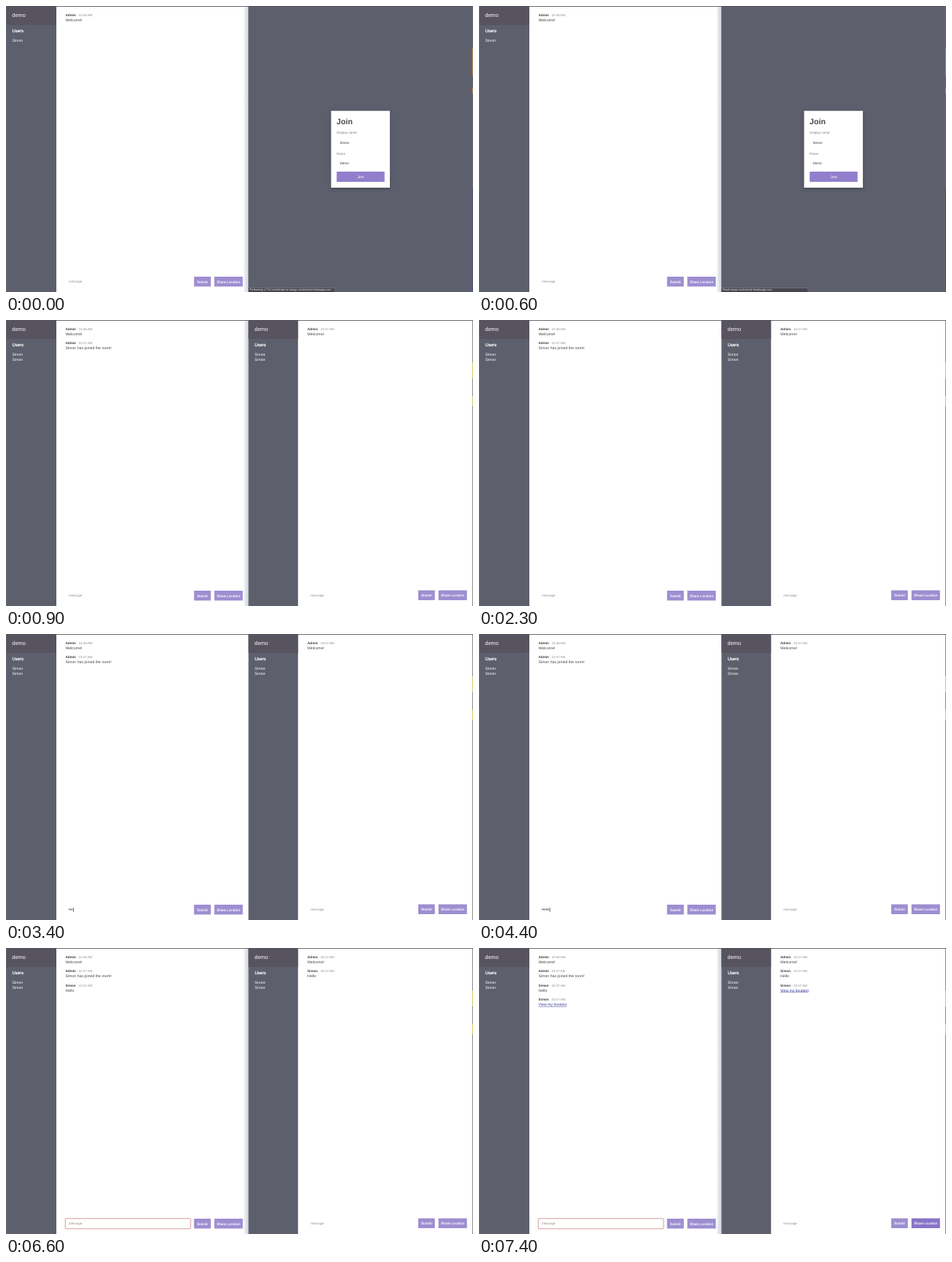
These frames come from a looping animation (640 px wide and 392 px high, 8000 ms). An HTML page:

```html
<!DOCTYPE html>
<html lang="en">
<head>
<meta charset="utf-8">
<title>Chat demo</title>
<style>
  html, body { margin: 0; width: 100%; height: 100%; overflow: hidden; background: #fff; }
  svg { display: block; width: 640px; height: 392px; }
  text {
    font-family: "Liberation Sans", Arial, Helvetica, sans-serif;
    text-rendering: geometricPrecision;
    white-space: pre;
  }
</style>
</head>
<body>
<svg id="stage" viewBox="0 0 640 392" xmlns="http://www.w3.org/2000/svg">
  <defs>
    <linearGradient id="edge">
      <stop offset="0" stop-color="#f4f6f8"/>
      <stop offset=".35" stop-color="#e3e8ec"/>
      <stop offset="1" stop-color="#cbd2d8"/>
    </linearGradient>
    <filter id="soft" x="-20%" y="-20%" width="140%" height="140%">
      <feGaussianBlur stdDeviation="2.5"/>
    </filter>
  </defs>
</svg>
<script>
const LOOP = 8000;
const USER = "Simon";
const HOST = "mango-socketchat.herokuapp.com";
const SLATE = "#5d606c", HEAD = "#57535f", LILAC = [157, 142, 209], VIOLET = [135, 116, 199];
const JOINED = 700, LISTED = 800, GREETED = 900, SENT = 5100, BLUR = 6600, SHARED = 7300;

const stage = document.getElementById("stage");
const timed = [];

// Adds a shape; spans are [start, end] pairs in ms during which it shows.
function add(tag, attrs, ...spans) {
  const el = document.createElementNS(stage.namespaceURI, tag);
  for (const k in attrs) el.setAttribute(k, attrs[k]);
  stage.append(el);
  if (spans.length) timed.push({ el, spans });
  return el;
}
const rect = (x, y, width, height, fill, ...spans) =>
  add("rect", { x, y, width, height, fill }, ...spans);

function text(str, x, y, size, fill, more, ...spans) {
  const el = add("text", { x, y, "font-size": size, fill, ...more }, ...spans);
  el.textContent = str;
  return el;
}
const from = t => [t, LOOP];
const rgb = c => `rgb(${c.map(Math.round).join()})`;
const bold = { "font-weight": 700 };
const mid = { "text-anchor": "middle" };

function button(label, x, y, w) {
  const el = rect(x, y, w, 13.5, rgb(LILAC));
  text(label, x + w / 2, y + 8.5, 4.78, "#fff", { ...mid, stroke: "#fff", "stroke-width": .12 });
  return el;
}

function message(x, row, who, time, body, start, link) {
  const y = 13.8 + row * 19.55, span = from(start);
  text(who, x, y, 4.65, "#3c3c40", bold, span);
  text(time, x + 18, y, 4.45, "#8a8a8e", {}, span);
  text(body, x, y + 6.9, 5.2, link ? "#34349c" : "#444448", {}, span);
  if (link) rect(x, y + 7.5, 38.5, .5, "#34349c", span);
}

function sidebar(x, w, titled, second, first) {
  rect(x, 0, w, 392, SLATE);
  rect(x, 0, w, 26, HEAD, from(titled));
  text("demo", x + 8.3, 15.4, 7.4, "#fff", {}, from(titled));
  text("Users", x + 8.5, 35.7, 5.9, "#fff", { stroke: "#fff", "stroke-width": .22 }, from(titled));
  text(USER, x + 8.5, 48.8, 5.2, "#fff", {}, from(first));
  text(USER, x + 8.5, 55.8, 5.2, "#fff", {}, from(second));
}

// Left window
rect(0, 0, 640, 392, "#fff");
sidebar(0, 69, 0, LISTED, 0);
message(81.5, 0, "Admin", "10:46 AM", "Welcome!", 0);
message(81.5, 1, "Admin", "10:47 AM", USER + " has joined the room!", GREETED);
message(81.5, 2, USER, "10:47 AM", "Hello", SENT);
message(81.5, 3, USER, "10:47 AM", "View my location", SHARED, true);
rect(326, 0, 6.5, 392, "url(#edge)", [0, 2300], from(BLUR));

const box = { x: 81.2, y: 370.8, width: 171.8, height: 14, rx: .8, fill: "none" };
add("rect", { ...box, stroke: "#f6c9d1", "stroke-width": 1.3 }, [SENT, BLUR]);
add("rect", { ...box, stroke: "#dd8f98", "stroke-width": .6 }, [SENT, BLUR]);
add("rect", { ...box, stroke: "#d38f92", "stroke-width": .9 }, from(BLUR));
text("message", 86, 379.4, 4.56, "#8d8d91", {}, [0, 3300], from(SENT));
const draft = text("", 86, 379.4, 4.65, "#2c2c30", {});
const caret = rect(85.5, 375, .6, 6, "#222");
const submit = button("Submit", 257.7, 371, 23);
button("Share Location", 285.5, 371, 39);

// Right window: chat
sidebar(332.3, 67.9, LISTED, LISTED, LISTED);
message(413, 0, "Admin", "10:47 AM", "Welcome!", GREETED);
message(413, 1, USER, "10:47 AM", "Hello", SENT);
message(413, 2, USER, "10:47 AM", "View my location", SHARED, true);
text("message", 417.3, 379, 4.56, "#8d8d91", {});
button("Submit", 565, 370.5, 22.7);
const share = button("Share Location", 592.7, 370.5, 39);

// Right window: join form
const form = [0, JOINED];
rect(332.3, 0, 307.7, 392, SLATE, form);
add("rect", { x: 445, y: 145, width: 81.5, height: 106, fill: "#33353f", opacity: .5, filter: "url(#soft)" }, form);
rect(445.5, 143.7, 80.6, 105.3, "#fff", form);
text("Join", 453, 161.8, 10.7, "#48484c", bold, form);
text("Display name:", 453.3, 175.4, 4.5, "#7c7c80", {}, form);
text(USER, 457.5, 188.7, 4.6, "#333337", {}, form);
text("Room", 453.3, 203.5, 4.5, "#7c7c80", {}, form);
text("Demo", 457.5, 216.7, 4.6, "#333337", {}, form);
rect(453.2, 227, 65.6, 14, "#917fcd", form);
text("Join", 486, 236, 5.2, "#fff", mid, form);

// Browser status line
rect(332.5, 386.4, 118.5, 5.6, "#7b7d86", form);
rect(332.5, 386.9, 118, 5.1, "#45464e", form);
[
  [`Performing a TLS handshake to ${HOST}…`, 0, 100],
  [`Waiting for ${HOST}…`, 100, 600],
  [`Read ${HOST}`, 600, JOINED]
].forEach(([s, a, b]) => text(s, 334, 390.4, 3.75, "#f0f0f2", {}, [a, b]));

// Window edges
rect(0, 0, 640, .9, "#55565d");
rect(0, 0, .6, 392, "#6b6d76");
rect(639.2, 0, .8, 392, "#6b6c74");
rect(639.1, 58, .9, 37, "#c98a4b", form);
rect(639.1, 112, .9, 8, "#c98a4b", form);
rect(639.1, 250, .9, 142, "#4a4f80", form);
rect(639.1, 58, .9, 22, "#d9d36a", from(JOINED));
rect(639.1, 104, .9, 14, "#d9d36a", from(JOINED));

const typing = [[3300, "H"], [3400, "He"], [3600, "Hel"], [3700, "Hell"], [3800, "Hello"], [SENT, ""]];
const blink = [[2700, 3900], [4400, 4900], [5200, 5700], [6300, BLUR]];

const within = (t, spans) => spans.some(([a, b]) => t >= a && t < b);
const ramp = (t, a, b) => Math.min(1, Math.max(0, (t - a) / (b - a)));
const tint = k => rgb(LILAC.map((c, i) => c + (VIOLET[i] - c) * k));

function draw(t) {
  for (const { el, spans } of timed)
    el.setAttribute("visibility", within(t, spans) ? "visible" : "hidden");

  const typed = typing.filter(([at]) => at <= t).pop();
  const str = typed ? typed[1] : "";
  if (draft.textContent !== str) draft.textContent = str;
  caret.setAttribute("x", str ? 86.2 + draft.getComputedTextLength() : 85.5);
  caret.setAttribute("visibility", within(t, blink) ? "visible" : "hidden");

  submit.setAttribute("fill", tint(ramp(t, 4700, 5000) - ramp(t, 5800, 6000)));
  share.setAttribute("fill", tint(ramp(t, 7100, 7400)));
}

const start = performance.now();
function tick() {
  draw((performance.now() - start) % LOOP);
  requestAnimationFrame(tick);
}
tick();
</script>
</body>
</html>
```
